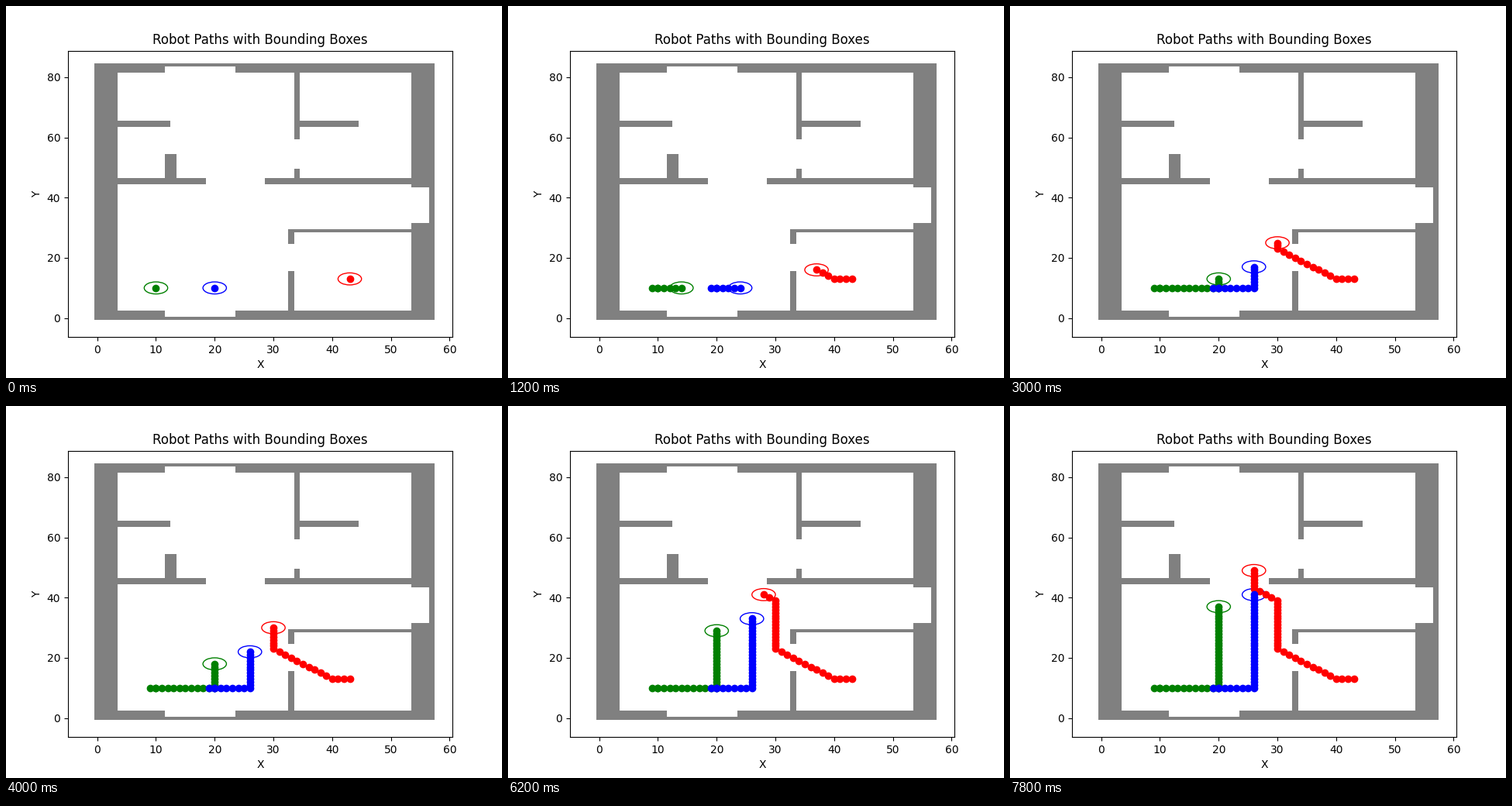
Animation of 640x480 px, one loop 8 s. Source, as a matplotlib script:

```python
import matplotlib.pyplot as plt
import numpy as np
from matplotlib.animation import FuncAnimation
from matplotlib.patches import Ellipse, Rectangle

STEPS = 40
INTERVAL = 200

# Corner points of each robot's route; it moves one cell per step
ROUTES = {
    "red": [(43, 13), (40, 13), (30, 23), (30, 39), (26, 43), (26, 49)],
    "green": [(10, 10), (9, 10), (20, 10), (20, 37)],
    "blue": [(20, 10), (19, 10), (26, 10), (26, 41)],
}

fig, ax = plt.subplots(figsize=(6.4, 4.8), dpi=100)
ax.set_title("Robot Paths with Bounding Boxes")
ax.set_xlabel("X")
ax.set_ylabel("Y")


def block(x0, x1, y0, y1, color):
    ax.add_patch(Rectangle((x0 - 0.5, y0 - 0.5), x1 - x0 + 1, y1 - y0 + 1,
                           facecolor=color, edgecolor="none"))


def wall(*cells):
    block(*cells, "gray")


def carve(*cells):
    block(*cells, "white")


def draw_house():
    # Solid shell, then the hall and its recesses
    wall(0, 57, 0, 84)
    carve(4, 53, 3, 81)
    carve(12, 23, 1, 83)
    carve(54, 56, 32, 43)

    # Long inner walls, each with a doorway
    wall(4, 53, 45, 46)
    carve(19, 28, 45, 46)
    wall(34, 34, 47, 81)
    carve(34, 34, 50, 59)
    wall(33, 33, 3, 29)
    carve(33, 33, 16, 24)

    # Short partitions
    wall(33, 53, 29, 29)
    wall(4, 12, 64, 65)
    wall(35, 44, 64, 65)
    wall(12, 13, 47, 54)


def fit_axis(low, high, margin=0.05):
    pad = margin * (high - low)
    return low - pad, high + pad


def walk(points):
    """Visit every cell between the corner points."""
    points = np.array(points)
    lengths = np.abs(np.diff(points, axis=0)).max(axis=1)
    arrival = np.concatenate(([0], np.cumsum(lengths)))
    steps = np.arange(STEPS)
    return [np.interp(steps, arrival, axis) for axis in points.T]


draw_house()
ax.set_xlim(fit_axis(-2, 57.5))
ax.set_ylim(fit_axis(-2, 84.5))

robots = []
for color, points in ROUTES.items():
    trail, = ax.plot([], [], "o", color=color)
    ring = ax.add_patch(Ellipse((0, 0), 4, 4, fill=False, edgecolor=color))
    robots.append((*walk(points), trail, ring))


def update(step):
    for x, y, trail, ring in robots:
        trail.set_data(x[:step + 1], y[:step + 1])
        ring.set_center((x[step], y[step]))


anim = FuncAnimation(fig, update, frames=STEPS, interval=INTERVAL,
                     repeat=True, repeat_delay=0)
plt.show()
```
